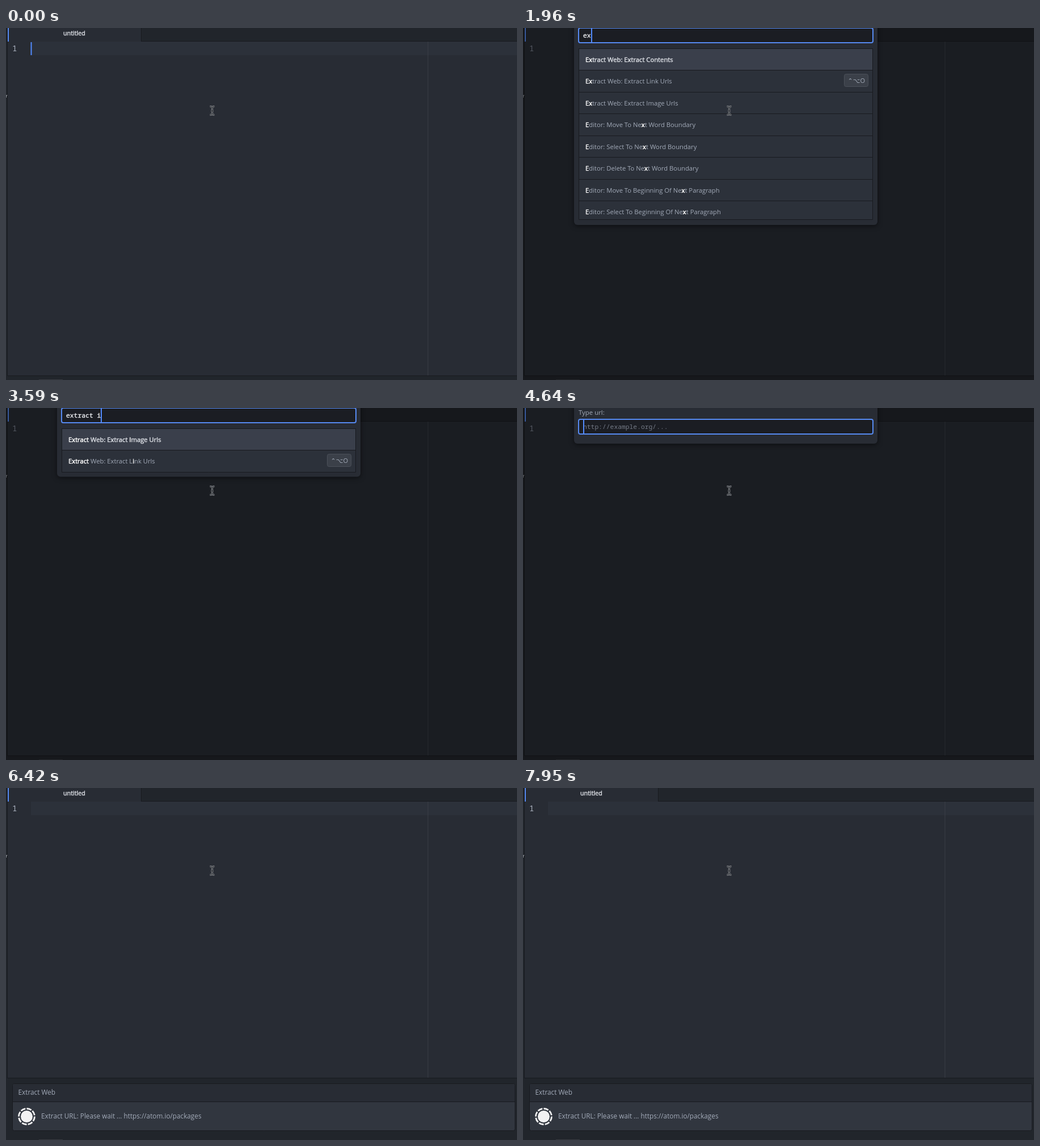
These frames come from a looping animation (901 px wide and 622 px high, 8 s). An HTML page with a canvas:

```html
<!DOCTYPE html>
<html lang="en">
<head>
<meta charset="utf-8">
<title>Command palette</title>
<style>
html, body { margin: 0; width: 100%; height: 100%; overflow: hidden; background: #282c34; }
canvas { display: block; width: 100vw; height: 100vh; }
</style>
</head>
<body>
<canvas id="stage" width="901" height="622"></canvas>
<script>
const ctx = document.getElementById('stage').getContext('2d');
const W = 901, H = 622, LOOP = 8000;
const UI = '"Open Sans", "DejaVu Sans", sans-serif';
const MONO = '"Noto Sans Mono", "DejaVu Sans Mono", monospace';
const BLUE = '#568af2', LINE = '#181a1f', BASE = '#282c34', BAR = '#21252b';
const GREY = '#a3abb9', BRIGHT = '#d9dce2', WHITE = '#ffffff';
const URL_TEXT = 'https://atom.io/packages';
const CHAR = 6.8;

const ALL = [
  ['Application: About'],
  ['Application: Add Project Folder', '⇧⌘O'],
  ['Application: Bring All Windows To Front'],
  ['Application: Hide', '⌘H'],
  ['Application: Hide Other Applications', '⌥⌘H'],
  ['Application: Install Update'],
  ['Application: Minimize', '⌘M'],
  ['Application: New File', '⌘N']
];
const CONTENTS = ['Extract Web: Extract Contents'];
const LINKS = ['Extract Web: Extract Link Urls', '⌃⌥O'];
const IMAGES = ['Extract Web: Extract Image Urls'];
const WEB = [CONTENTS, LINKS, IMAGES];
const LOOSE = [
  ...WEB,
  ['Editor: Move To Next Word Boundary'],
  ['Editor: Select To Next Word Boundary'],
  ['Editor: Delete To Next Word Boundary'],
  ['Editor: Move To Beginning Of Next Paragraph'],
  ['Editor: Select To Beginning Of Next Paragraph']
];

const QUERY = 'extract image';
const KEYS = [1370, 1820, 1970, 2120, 2260, 2560, 2700, 3150, 3450, 3600, 3750, 3900, 4040];

function rect(x, y, w, h, color) {
  ctx.fillStyle = color;
  ctx.fillRect(x, y, w, h);
}

function box(x, y, w, h, r, fill, stroke, width = 1) {
  ctx.beginPath();
  ctx.roundRect(x, y, w, h, r);
  ctx.fillStyle = fill;
  ctx.fill();
  if (!stroke) return;
  ctx.strokeStyle = stroke;
  ctx.lineWidth = width;
  ctx.stroke();
}

// Draws text and returns its advance; weight is an extra outline in pixels.
function text(str, x, y, size, color, weight = 0, family = UI) {
  ctx.font = `${size}px ${family}`;
  ctx.fillStyle = ctx.strokeStyle = color;
  ctx.fillText(str, x, y);
  if (weight) {
    ctx.lineWidth = weight;
    ctx.lineJoin = 'round';
    ctx.strokeText(str, x, y);
  }
  return ctx.measureText(str).width;
}

function editor(bottom, active) {
  rect(0, 0, W, H, BAR);
  rect(2, 0, 1, bottom, LINE);
  rect(3, 24, W - 3, bottom - 24, BASE);
  rect(238, 23, W - 238, 1, LINE);
  rect(238, 0, 1, 24, LINE);
  rect(3, 0, 235, 24, BASE);
  rect(3, 0, 2, 24, BLUE);
  text('untitled', 101, 13, 10.75, BRIGHT, 0.45);
  if (active) rect(44, 24, W - 44, 24, '#2c313a');
  text('1', 11, 41, 14, active ? '#abb2bf' : '#7d8491', 0, MONO);
  rect(743.5, 24, 1, bottom - 24, '#3b3f47');
  rect(2, bottom, W - 2, 1, LINE);
  rect(58, 621, 42, 1, '#383b41');
  rect(0, 119, 1, 4, '#8c9096');
  rect(1, 118, 1, 2, '#8c9096');
}

function pointer() {
  const beam = [['#85888c', 3], ['#1d2025', 1]];
  for (const [color, width] of beam) {
    ctx.beginPath();
    ctx.moveTo(359.5, 138.5);
    ctx.quadraticCurveTo(363.5, 138.5, 363.5, 141);
    ctx.lineTo(363.5, 151);
    ctx.quadraticCurveTo(363.5, 153.5, 359.5, 153.5);
    ctx.moveTo(367.5, 138.5);
    ctx.quadraticCurveTo(363.5, 138.5, 363.5, 141);
    ctx.moveTo(363.5, 151);
    ctx.quadraticCurveTo(363.5, 153.5, 367.5, 153.5);
    ctx.moveTo(361.5, 146.5);
    ctx.lineTo(365.5, 146.5);
    ctx.strokeStyle = color;
    ctx.lineWidth = width;
    ctx.stroke();
  }
}

function dialog(bottom) {
  rect(0, 0, W, H, 'rgba(0,0,0,.35)');
  ctx.save();
  ctx.shadowColor = 'rgba(0,0,0,.5)';
  ctx.shadowBlur = 8;
  ctx.shadowOffsetY = 2;
  box(90, -10, 535, bottom + 10, 6, BASE);
  ctx.restore();
}

function input(top, str, caret, hint) {
  box(98, top, 519, 26, 3, '#1b1d23', BLUE, 2);
  const y = top + 17;
  if (str) text(str, 106, y, CHAR / 0.6, '#eceef2', 0.4, MONO);
  else if (hint) text(hint, 106, y, CHAR / 0.6, '#747a86', 0, MONO);
  if (caret) rect(Math.round(106 + str.length * CHAR), top + 1, 2, 24, '#528bff');
}

function keycap(keys, top) {
  ctx.font = `11px ${UI}`;
  const w = Math.round(ctx.measureText(keys).width) + 12;
  box(608.5 - w, top + 7.5, w, 22, 3, '#3b4049', '#4b5059');
  text(keys, 614.5 - w, top + 22.5, 11, GREY);
}

// Letters of the query, found in order, are set in bold white.
function label(str, query, y, selected) {
  let x = 110, found = 0;
  const runs = [];
  for (const ch of str) {
    const hit = found < query.length && ch.toLowerCase() === query[found];
    if (hit) found++;
    const last = runs[runs.length - 1];
    if (last && last.hit === hit) last.str += ch;
    else runs.push({ str: ch, hit });
  }
  for (const run of runs) {
    const color = run.hit ? WHITE : selected ? BRIGHT : GREY;
    x += text(run.str, x, y, 11.25, color, run.hit || selected ? 0.45 : 0);
  }
}

function palette(query, items, caret) {
  const full = items.length === 8;
  const bottom = full ? 338 : Math.round(36.5 + 38.45 * items.length);
  dialog(full ? 348 : bottom + 8.5);
  input(0, query, caret);
  ctx.save();
  ctx.beginPath();
  ctx.rect(98, 36, 519, bottom - 35);
  ctx.clip();
  items.forEach(([name, keys], i) => {
    const top = Math.round(36 + 38.45 * i);
    rect(98, top, 519, 39, i ? '#2c313a' : '#3a3f4b');
    rect(98, top, 519, 1, LINE);
    label(name, query.length > 1 ? query : '', top + 23.5, i === 0);
    if (keys) keycap(keys, top);
  });
  ctx.strokeStyle = LINE;
  ctx.lineWidth = 1;
  ctx.strokeRect(98.5, 36.5, 518, bottom - 36);
  ctx.restore();
}

function matches(n) {
  if (n < 2) return ALL;
  if (n < 6) return LOOSE;
  if (n < 9) return WEB;
  return n === 9 ? [IMAGES, LINKS] : [IMAGES];
}

function urlPrompt(t) {
  dialog(63);
  text('Type url:', 98, 12, 11.4, GREY);
  const caret = t < 4940 || (t >= 5230 && t < 5980);
  input(20, t < 5530 ? '' : URL_TEXT, caret, 'http://example.org/...');
}

function spinner(t) {
  const cx = 36.5, cy = 580.5, pitch = Math.PI / 4;
  const turn = Math.floor((t - 6420) / 152) * pitch / 5;
  ctx.fillStyle = ctx.strokeStyle = '#f2f2f3';
  ctx.beginPath();
  ctx.arc(cx, cy, 10.5, 0, Math.PI * 2);
  ctx.fill();
  ctx.lineWidth = 2.8;
  for (let i = 0; i < 8; i++) {
    const a = turn + i * pitch;
    ctx.beginPath();
    ctx.arc(cx, cy, 14, a, a + pitch * 0.8);
    ctx.stroke();
  }
}

function message(t) {
  box(11.5, 522.5, 886, 83, 3, '#31363f', LINE);
  box(12, 523, 885, 31, [3, 3, 0, 0], BASE);
  rect(12, 554, 885, 1, LINE);
  text('Extract Web', 21.5, 542, 11.8, GREY);
  text('Extract URL: Please wait ... ' + URL_TEXT, 62, 583.5, 11.75, GREY);
  spinner(t);
}

function draw(t) {
  const waiting = t >= 6420;
  const open = t >= 750 && !waiting;
  editor(waiting ? 512 : 614, !open);
  if (waiting) message(t);
  else if (!open) rect(43.5, 25, 2, 23, '#528bff');
  else if (t >= 4640) urlPrompt(t);
  else {
    const typed = KEYS.filter(k => k <= t).length;
    palette(QUERY.slice(0, typed), matches(typed), t >= 920);
  }
  pointer();
}

const start = performance.now();
function tick() {
  draw((performance.now() - start) % LOOP);
  requestAnimationFrame(tick);
}
tick();
</script>
</body>
</html>
```
